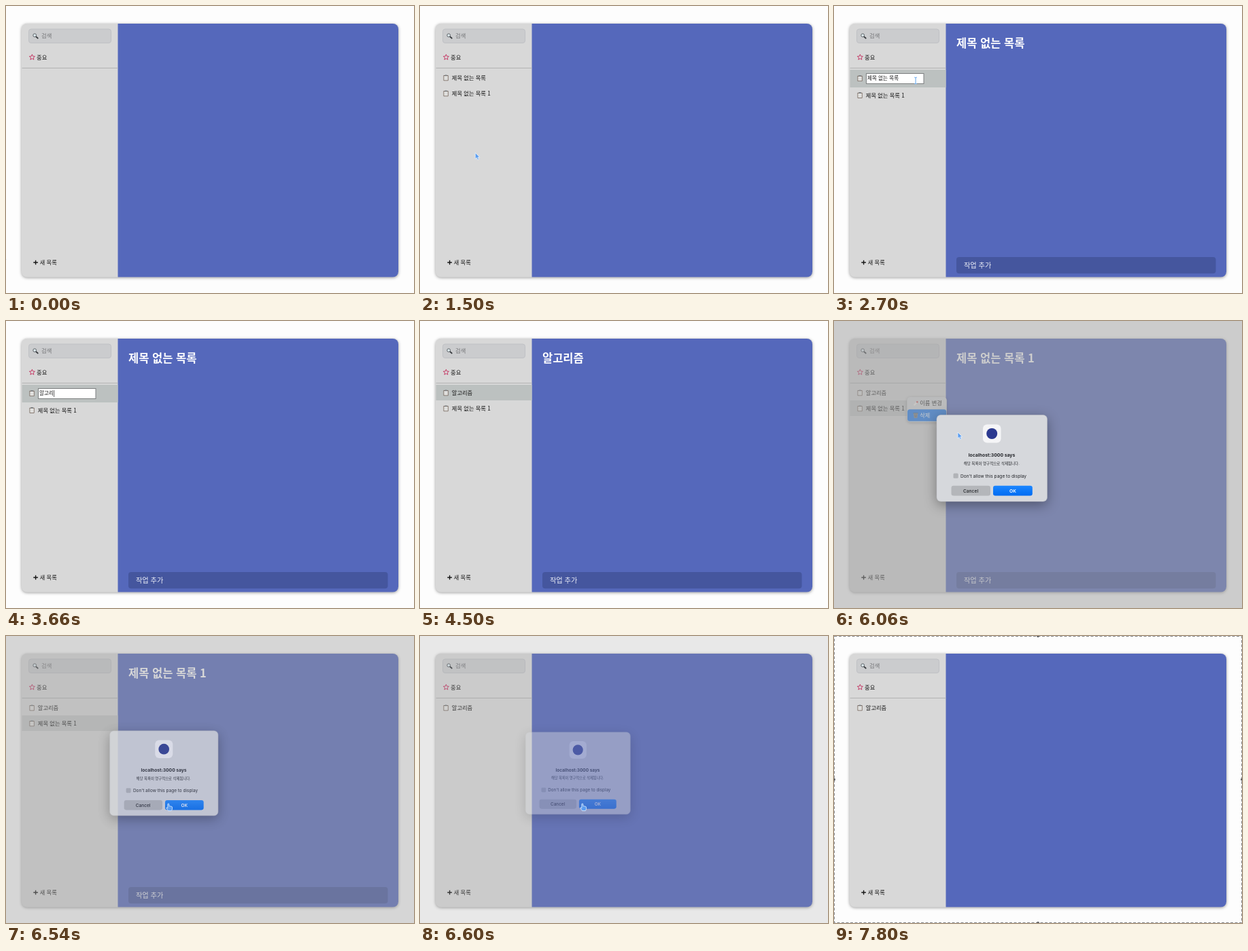
Recreate the animation shown at these times as an HTML page. Size 600 px wide and 423 px high, loop 8.28 s.

```html
<!DOCTYPE html>
<html lang="ko">
<head>
<meta charset="utf-8">
<title>할 일 목록</title>
<style>
  html, body { margin: 0; width: 100%; height: 100%; overflow: hidden; background: #fdfdfd; }
  svg { display: block; width: 600px; height: 423px; }
  text { font-family: "Noto Sans CJK KR", "Noto Sans KR", "Noto Sans CJK", sans-serif; font-weight: 500; fill: #161616; white-space: pre; }
  .latin text { font-family: Inter, sans-serif; fill: #222428; }
  .latin .ko { font-family: "Noto Sans CJK KR", "Noto Sans CJK", sans-serif; }
  .mid { text-anchor: middle; }
  .window { filter: drop-shadow(0 1px 2px rgba(0, 0, 0, .4)); }
  .panel { filter: drop-shadow(0 5px 9px rgba(0, 0, 0, .36)); }
  .menuBox { filter: drop-shadow(0 1px 2px rgba(0, 0, 0, .3)); }
</style>
</head>
<body>
<svg viewBox="0 0 600 423">
  <defs>
    <clipPath id="frame"><rect x="23" y="26" width="554" height="373.5" rx="8"/></clipPath>
    <linearGradient id="okFill" x2="0" y2="1">
      <stop stop-color="#1c86ff"/><stop offset="1" stop-color="#006cf2"/>
    </linearGradient>
    <g id="clip">
      <rect x="34.5" y="-4" width="7.2" height="8.2" rx=".8" fill="#77685f"/>
      <rect x="35.4" y="-2.9" width="5.4" height="6.3" fill="#eeeeec"/>
      <rect x="36.6" y="-4.6" width="3" height="1.8" rx=".5" fill="#777c80"/>
      <path d="M36.2-1h3.8M36.2.7h3.8M36.2 2.3h3.8" stroke="#b9b9b9" stroke-width=".5"/>
    </g>
  </defs>

  <rect width="600" height="423" fill="#fdfdfd"/>
  <rect class="window" x="23" y="26" width="554" height="373.5" rx="8" fill="#d8d8d8"/>
  <g clip-path="url(#frame)">
    <rect x="23" y="26" width="142" height="374" fill="#d8d8d8"/>
    <rect x="164.5" y="26" width="413" height="374" fill="#5568bb"/>
  </g>

  <rect x="33.5" y="34" width="121" height="20.5" rx="3.5" fill="#cbccce" stroke="#bfc1c5"/>
  <path d="M43.8 44.8l3 2.7" stroke="#34383b" stroke-width="1.7" stroke-linecap="round"/>
  <circle cx="42.2" cy="43.2" r="2.4" fill="#dbe7ec" stroke="#54595d" stroke-width=".9"/>
  <text x="52" y="47" font-size="8.3" style="fill:#747577;font-weight:400">검색</text>
  <path id="star" fill="none" stroke="#c32c5c" stroke-width=".9" stroke-linejoin="round"/>
  <text x="45" y="78.6" font-size="8.4">중요</text>
  <path d="M23.5 91.5H164.5" stroke="#b2b3b3"/>
  <path d="M40.3 378h6.6M43.6 374.7v6.6" stroke="#161616" stroke-width="1.4"/>
  <text x="49.8" y="381" font-size="8.2">새 목록</text>

  <g id="rowA">
    <rect id="markA" x="23.5" y="94" width="141" fill="#bcc1c0"/>
    <use id="iconA" href="#clip"/>
    <text id="nameA" x="46.8" y="109" font-size="8.25"></text>
  </g>
  <g id="rowB">
    <rect id="markB" x="23.5" y="117" width="141" height="23" fill="#c4c6c6"/>
    <use id="iconB" href="#clip" y="129"/>
    <text id="nameB" x="46.8" font-size="8.25">제목 없는 목록 1</text>
  </g>
  <g id="field">
    <rect x="47.5" y="99.5" width="84.5" height="15" fill="#fff" stroke="#7c7f80"/>
    <rect id="selection" x="49" y="101.5" width="46" height="11" fill="#b3d4fb"/>
    <text id="typed" x="49" y="109.4" font-size="7.6"></text>
    <rect id="caret" y="102" width=".7" height="10" fill="#222"/>
  </g>

  <g id="detail">
    <text id="title" x="180" y="61" font-size="16.5" style="fill:#fff;font-weight:700"></text>
    <rect x="180" y="370" width="381.5" height="24.3" rx="4" fill="#45569e"/>
    <text x="191" y="385.5" font-size="10.2" style="fill:#eef0f8">작업 추가</text>
  </g>

  <g id="menu">
    <rect class="menuBox" width="58.5" height="37" rx="5" fill="#d8dadb"/>
    <rect id="hover" x=".7" width="57.2" height="17.5" rx="3.5" fill="#1a78ee"/>
    <path d="M10.3 12.2l4.6-4.8" stroke="#f4f0ec" stroke-width="2.2"/>
    <path d="M14.2 8.1l1.6-1.6" stroke="#d14b4b" stroke-width="2.2"/>
    <path d="M9.6 24h6.4l-.9 7h-4.6z" fill="#7d858c"/>
    <path d="M9 23.8h7.6M11.6 25.5l.4 4.5M14 25.5l-.4 4.5" stroke="#4f565c" stroke-width=".8"/>
    <text id="renameText" x="19" y="12.2" font-size="8.2">이름 변경</text>
    <text id="deleteText" x="19" y="30.2" font-size="8.2">삭제</text>
  </g>

  <rect id="dim" width="600" height="423" fill="#a0a0a0"/>

  <g id="dialog" class="latin">
    <rect class="panel" x="151" y="138.5" width="162.5" height="127.5" rx="6" fill="#d6d8dc" stroke="#b9bbc0" stroke-width=".5"/>
    <rect x="219" y="152.5" width="26.5" height="27" rx="6" fill="#f5f5f7"/>
    <circle cx="232.2" cy="166" r="8" fill="#2b3990"/>
    <text class="mid" x="232" y="199.6" font-size="6.85" style="font-weight:700">localhost:3000 says</text>
    <text class="mid ko" x="231.7" y="212" font-size="5.5">해당 목록이 영구적으로 삭제됩니다.</text>
    <rect x="175.5" y="224.6" width="7.2" height="7.2" rx="1.5" fill="#b1b3b7"/>
    <text x="186" y="230.7" font-size="6.6" style="font-weight:400">Don't allow this page to display</text>
    <rect x="172.5" y="242.8" width="57.5" height="14.7" rx="3.2" fill="#b4b6ba"/>
    <text class="mid" x="201" y="252.5" font-size="6.7">Cancel</text>
    <rect x="234" y="242.8" width="57.8" height="14.7" rx="3.2" fill="url(#okFill)"/>
    <text class="mid" x="263" y="252.5" font-size="6.7" style="fill:#fff;font-weight:600">OK</text>
  </g>

  <g id="cursor" fill="#5b9df0" stroke="#e8f2fd" stroke-width=".8" stroke-linejoin="round">
    <path id="arrow" d="M0 0v9.2l2.1-1.9 1.5 3.3 1.7-.8-1.5-3.1h2.9z"/>
    <path id="hand" d="M-1.2.6q1.2-1.3 2 0v3.2q1.1-.7 1.7.2 1.2-.5 1.6.4 1.3-.2 1.4 1v2.2q-.2 1.6-1.2 3h-4.7q-1.5-2-3-4.2.6-1.2 2.2.2z"/>
    <path id="beam" d="M-1.8-4.8q1.8 0 1.8 1.2 0-1.2 1.8-1.2M0-3.6v7.2M-1.8 4.8q1.8 0 1.8-1.2 0 1.2 1.8 1.2" fill="none" stroke="#79b2ee" stroke-width="1.2"/>
  </g>

  <g id="capture">
    <rect x=".5" y=".5" width="599" height="422" fill="none" stroke="#85878a" stroke-dasharray="4 2.5"/>
    <path d="M300 0v.1M300 423v.1M0 211.5v.1M600 211.5v.1" stroke="#5b5d60" stroke-width="4" stroke-linecap="round"/>
  </g>
</svg>

<script>
const LOOP = 8280, STEP = 60;
const UNTITLED = '제목 없는 목록', RENAMED = '알고리즘';
const COMPOSING = ['ㅇ', '아', '알', '앍', '알고', '알골', '알고리', '알고맂', '알고리즈', RENAMED];

// Moments of the story in milliseconds
const T = {
  addA: 900, addB: 1140, selectA: 1800, menuA: 2040, edit: 2460,
  selectAll: 2820, type: 3180, commit: 4140, selectB: 5220,
  menuB: 5400, open: 5928, menuGone: 6120, close: 6504, removed: 6600, capture: 7500
};
// Pointer stops: time, x, y
const PATH = [
  [0, -6, 367], [780, 55, 376], [1200, 55, 376], [1740, 100, 102], [2100, 100, 102],
  [2400, 120, 110], [4800, 122, 108], [4860, 122, 117], [4920, 122, 126], [5100, 122, 126],
  [5220, 108, 126], [5460, 108, 126], [5760, 134, 142], [5940, 134, 142],
  [6060, 182, 164], [6360, 239, 247], [LOOP, 239, 247]
];

const el = {};
document.querySelectorAll('[id]').forEach(node => el[node.id] = node);

const during = (t, from, to) => t >= from && t < to;
const ramp = (t, from, to) => Math.min(1, Math.max(0, (t - from) / (to - from)));
const ease = p => p * p * (3 - 2 * p);
const show = (node, on) => node.setAttribute('visibility', on ? 'inherit' : 'hidden');
const set = (node, attrs) => Object.entries(attrs).forEach(([k, v]) => node.setAttribute(k, v));
const write = (node, text) => { if (node.textContent !== text) node.textContent = text; };

set(el.star, {
  d: 'M' + Array.from({ length: 10 }, (_, i) => {
    const r = i % 2 ? 1.9 : 4.3, a = (i / 5 - .5) * Math.PI;
    return [38.4 + r * Math.cos(a), 75.6 + r * Math.sin(a)].map(v => v.toFixed(2));
  }).join('L') + 'z'
});

function pointerAt(t) {
  const i = PATH.findIndex(stop => stop[0] > t);
  const [t0, x0, y0] = PATH[i - 1], [t1, x1, y1] = PATH[i];
  const p = ease(ramp(t, t0, t1));
  return [x0 + (x1 - x0) * p, y0 + (y1 - y0) * p];
}

function drawLists(t) {
  const editing = during(t, T.edit, T.commit);
  const shift = editing ? 2.7 : 0;
  show(el.rowA, t >= T.addA);
  show(el.markA, during(t, T.selectA, T.selectB));
  set(el.markA, { height: editing ? 26 : 23 });
  set(el.iconA, { y: editing ? 106.8 : 106 });
  write(el.nameA, editing ? '' : t < T.commit ? UNTITLED : RENAMED);

  show(el.rowB, during(t, T.addB, T.removed));
  show(el.markB, during(t, T.selectB, T.removed));
  set(el.iconB, { y: 129 + shift });
  set(el.nameB, { y: 132 + shift });

  show(el.field, editing);
  const typing = t >= T.type;
  const stage = Math.min(COMPOSING.length - 1, Math.floor((t - T.type) / 80));
  const text = typing ? COMPOSING[stage] : UNTITLED;
  write(el.typed, text);
  show(el.selection, during(t, T.selectAll, T.type));
  show(el.caret, editing && typing);
  set(el.caret, { x: 49.4 + text.length * 7 });

  show(el.detail, during(t, T.selectA, T.removed));
  write(el.title, t < T.commit ? UNTITLED : t < T.selectB ? RENAMED : UNTITLED + ' 1');
}

function drawMenu(t, x, y) {
  const second = t >= T.menuB;
  const left = second ? 107.3 : 100, top = second ? 112 : 95;
  const row = y - top > 18.5 ? 1 : 0;
  const inside = x > left + 2 && y > top || t >= T.open;
  const picked = t >= T.open ? 1 : row;
  show(el.menu, during(t, T.menuA, T.edit) || during(t, T.menuB, T.menuGone));
  set(el.menu, { transform: `translate(${left} ${top})` });
  show(el.hover, false);
  if (inside) {
    show(el.hover, true);
    set(el.hover, { y: picked ? 18.2 : .8 });
  }
  el.renameText.style.fill = inside && !picked ? '#fff' : '#161616';
  el.deleteText.style.fill = inside && picked ? '#fff' : '#161616';
}

function drawDialog(t) {
  const p = ramp(t, T.open, 6060) - ramp(t, T.close, 6672);
  const scale = .91 + .09 * p;
  show(el.dialog, p > 0);
  set(el.dim, { opacity: .53 * p });
  set(el.dialog, {
    opacity: p,
    transform: `translate(232 202) scale(${scale}) translate(-232 -202)`
  });
}

function drawCursor(t, x, y) {
  const beam = during(t, T.edit + STEP, T.selectAll);
  const hand = during(t, 720, 1260) || during(t, 1680, T.menuA)
    || during(t, 5100, T.menuB) || during(t, T.close, 6960);
  show(el.cursor, t < T.selectAll || during(t, 4860, 6960));
  set(el.cursor, { transform: `translate(${x} ${y})` });
  show(el.beam, beam);
  show(el.hand, hand);
  show(el.arrow, !beam && !hand);
}

function draw(t) {
  const [x, y] = pointerAt(t);
  drawLists(t);
  drawMenu(t, x, y);
  drawDialog(t);
  drawCursor(t, x, y);
  show(el.capture, t >= T.capture);
}

const start = performance.now();
function tick() {
  const t = (performance.now() - start) % LOOP;
  draw(Math.floor(t / STEP) * STEP);
  requestAnimationFrame(tick);
}
tick();
</script>
</body>
</html>
```
